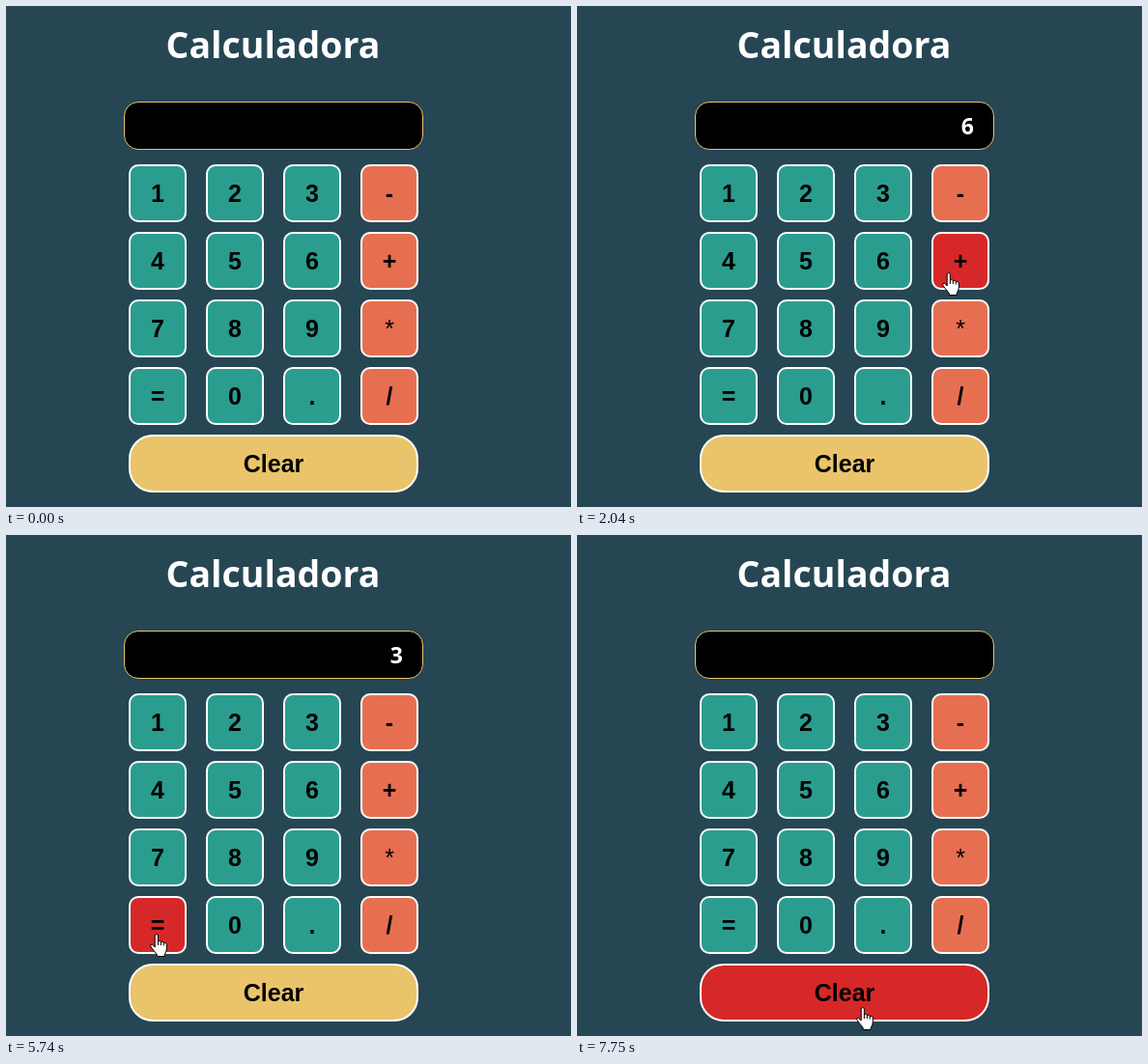
Write an HTML page with a canvas that moves like this. It is 585 px wide and 519 px high and loops after 8000 ms.

```html
<!DOCTYPE html>
<html lang="pt">
<head>
<meta charset="utf-8">
<title>Calculadora</title>
<style>
html, body { margin: 0; width: 100%; height: 100%; overflow: hidden; background: #264653; }
canvas { display: block; }
</style>
</head>
<body>
<canvas id="stage" width="585" height="519"></canvas>
<script>
const ctx = document.getElementById('stage').getContext('2d');
const LOOP = 8000;
const STEP = 69;
const COLORS = { bg: '#264653', digit: '#2a9d8f', op: '#e76f51', clear: '#e9c46a', hover: '#d62828' };
const KEY_FONT = '25px "Liberation Sans", Arial, sans-serif';
const UI_FONT = '"Open Sans", "Noto Sans", sans-serif';

const keys = [...'123-456+789*=0./'].map((label, i) => ({
  label, x: 127 + i % 4 * 80, y: 164 + Math.floor(i / 4) * 70,
  w: 60, r: 10, color: i % 4 === 3 ? COLORS.op : COLORS.digit
}));
keys.push({ label: 'Clear', x: 127, y: 444, w: 300, r: 25, color: COLORS.clear });

// Each move is a curve from the last stop, pulled towards "bend"
const moves = [
  { at: 390, steps: 10, from: [575, 555], bend: [150, 250], to: [309, 264] },
  { at: 1760, steps: 9, bend: [395, 330], to: [413, 197] },
  { at: 2980, steps: 6, bend: [338, 156], to: [313, 185], ease: 2 },
  { at: 4660, steps: 2, bend: [274, 208], to: [134, 430] },
  { at: 5210, steps: 2, bend: [147, 420], to: [155, 413] },
  { at: 6470, steps: 5, bend: [300, 300], to: [355, 266] },
  { at: 6810, steps: 7, bend: [335, 360], to: [302, 483] },
  { at: 7290, steps: 1, bend: [299, 486], to: [295, 489] }
];
moves.forEach((m, i) => { m.from ||= moves[i - 1].to; });

const clicks = [
  { down: 1290, up: 1560, shows: '6' },
  { down: 2510, up: 2710, shows: '6-' },
  { down: 3930, up: 4130, shows: '6-3' },
  { down: 5480, up: 5740, shows: '3' },
  { down: 7620, up: 7750, shows: '' }
];

const hand = new Path2D('M5.2 14V2Q5.2.6 6.8.6Q8.4.6 8.4 2V8Q10.2 6.8 11.4 8.5Q13.2 7.6 14.3 9.5' +
  'Q16.7 8.8 17.3 11V16Q17 19 15.2 21.5V23.5H7.2V21.5L2 15Q0 12.5.8 11.6Q2.4 10.6 3.8 12.4L5.2 14Z');
const knuckles = new Path2D('M8.4 8V12M11.4 8.5V12M14.3 9.5V12.5');
const arrow = new Path2D('M.5.5V16.5L4.2 13L6.8 19L9.2 18L6.7 12.2H11.8Z');

function curve({ from, bend, to, ease = 1 }, u) {
  const e = 1 - (1 - u) ** ease;
  const n = 1 - e;
  return from.map((v, k) => Math.round(n * n * v + 2 * n * e * bend[k] + e * e * to[k]));
}

function keyAt([x, y]) {
  return keys.find(k => x >= k.x && x < k.x + k.w && y >= k.y && y < k.y + 60);
}

function pointerAt(t) {
  const move = moves.findLast(m => t >= m.at);
  if (!move) return null;
  const step = Math.min(move.steps - 1, Math.floor((t - move.at) / STEP + 0.1));
  const pos = curve(move, (step + 1) / move.steps);
  // The hover state catches up after the first step of a move
  return { pos, hover: keyAt(step || move.steps === 1 ? pos : move.from) };
}

function box(x, y, w, h, r, line, fill, stroke) {
  const d = line / 2;
  ctx.beginPath();
  ctx.roundRect(x + d, y + d, w - line, h - line, r - d);
  ctx.fillStyle = fill;
  ctx.fill();
  ctx.lineWidth = line;
  ctx.strokeStyle = stroke;
  ctx.stroke();
}

function text(str, x, y, font, color, align = 'center') {
  ctx.font = font;
  ctx.textAlign = align;
  ctx.fillStyle = color;
  ctx.fillText(str, x, y);
}

function drawKey(k, hovered) {
  box(k.x, k.y, k.w, 60, k.r, 2, hovered ? COLORS.hover : k.color, '#fff');
  const weight = k.label === '*' ? 'normal ' : 'bold ';
  text(k.label, k.x + k.w / 2, k.y + 39, weight + KEY_FONT, '#000');
}

function drawPointer([x, y]) {
  const overKey = keyAt([x, y]);
  const shape = overKey ? hand : arrow;
  ctx.save();
  ctx.translate(overKey ? x - 6 : x, y);
  ctx.lineWidth = 1;
  ctx.strokeStyle = '#000';
  ctx.fillStyle = '#fff';
  ctx.fill(shape);
  ctx.stroke(shape);
  if (overKey) ctx.stroke(knuckles);
  ctx.restore();
}

function drawPress([x, y]) {
  ctx.beginPath();
  ctx.arc(x, y, 12, 0, Math.PI * 2);
  ctx.fillStyle = 'rgba(255, 240, 0, 0.5)';
  ctx.fill();
}

function draw(t) {
  const pointer = pointerAt(t);
  const done = clicks.findLast(c => t >= c.up);

  ctx.fillStyle = COLORS.bg;
  ctx.fillRect(0, 0, 585, 519);
  text('Calculadora', 276.5, 54, 'bold 37.5px ' + UI_FONT, '#fff');
  box(122, 99, 310, 50, 15, 1, '#000', COLORS.clear);
  if (done) text(done.shows, 411, 133, 'bold 23px ' + UI_FONT, '#fff', 'right');
  keys.forEach(k => drawKey(k, pointer && pointer.hover === k));

  if (!pointer) return;
  if (clicks.some(c => t >= c.down && t < c.up)) drawPress(pointer.pos);
  drawPointer(pointer.pos);
}

const begin = performance.now();
function frame() {
  draw((performance.now() - begin) % LOOP);
  requestAnimationFrame(frame);
}
frame();
</script>
</body>
</html>
```
